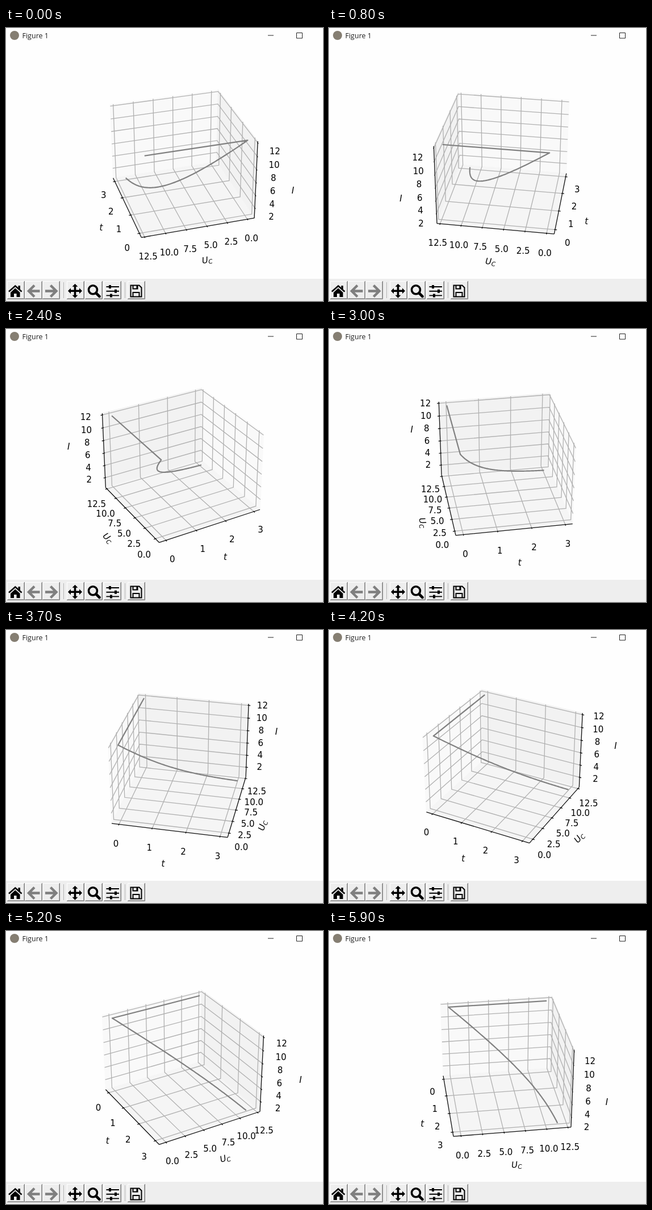
An HTML page that plays this animation: 558 px wide and 480 px high, repeating every 6000 ms.

```html
<!DOCTYPE html>
<html lang="en">
<head>
<meta charset="utf-8">
<title>Figure 1</title>
<style>
  html, body { margin: 0; width: 100%; height: 100%; overflow: hidden; background: #fefefe; }
  svg { display: block; width: 558px; height: 480px; }
  #plot text { font: 15px "DejaVu Sans", sans-serif; text-anchor: middle; }
  #plot .name { font-style: oblique; }
  #plot .sub { font-size: 10.5px; }
  #plot path { fill: none; stroke-width: 1.3; }
</style>
</head>
<body>
<svg viewBox="0 0 558 480">
  <rect width="558" height="480" fill="#fefefe"/>
  <circle cx="15" cy="13" r="8" fill="#857e72"/>
  <text x="28.5" y="18" fill="#222" font-size="12.5" font-family="'Open Sans', sans-serif">Figure 1</text>
  <path d="M461 13h10M511.5 8.5h10v9.5h-10z" fill="none" stroke="#222"/>

  <g id="plot"></g>

  <rect y="441" width="558" height="39" fill="#eee"/>
  <g id="buttons"></g>
  <path d="M101.5 447v28M209.5 447v28" stroke="#b4b4b4"/>
  <g id="icons" fill="none" stroke="#000">
    <path d="M5 463.5L16.3 453.5L27.6 463.5" stroke-width="2.6"/>
    <path d="M21.500 453h3.500v7h-3.500zM16.300 457.500l8.300 7.500v8h-6v-6h-4.600v6H8v-8z" fill="#000" stroke="none"/>
    <g stroke="#7f7f7f" stroke-width="4.4">
      <path d="M50 452.5L40 462.5L50 472.5M41 462.5h18.5"/>
      <path d="M78.500 452.500L88.500 462.500L78.500 472.500M87.500 462.500h-18.500"/>
    </g>
    <path d="M121.500 449.700l5 5h-3.200v5.700h5.700v-3.200l5 5-5 5v-3.200h-5.700v5.700h3.200l-5 5-5-5h3.200v-5.700h-5.700v3.200l-5-5 5-5v3.200h5.700v-5.700h-3.200z" fill="#000" stroke="none"/>
    <circle cx="153" cy="460.300" r="7.500" stroke-width="3.600"/>
    <path d="M158.500 466l6 6" stroke-width="4.600" stroke-linecap="round"/>
    <path d="M176.500 455h22.500M176.500 462.700h22.500M176.500 470.400h22.500" stroke-width="1.900"/>
    <path d="M183 452v6M193 459.700v6M185 467.400v6" stroke-width="4"/>
    <path d="M219.500 452.500h15l4 4v16h-19z" stroke-width="2"/>
    <path d="M223.500 472v-7h11v7M223.500 453v5.500h8v-5.500" stroke-width="2"/>
    <path d="M229.500 453h2.500v5h-2.500z" fill="#000" stroke="none"/>
  </g>
</svg>
<script>
const STEP = 100, FRAMES = 60;
const AZIM = -196.55, TURN = 3.204;        // degrees, degrees per step
const SCALE = 1707, CX = 308.7, CY = 233.2, DIST = 10;
const PAD = 1.35, NAME_PAD = 2.93;         // label offsets in units of D

const HALF = [4 / 7, 4 / 7, 3 / 7];        // half size of the data limits
const H = HALF.map(v => v * 25 / 24);      // half size of the drawn box
const D = HALF.map(v => v / 6);

const V = 12, I_END = V * Math.exp(-3);
const LIMITS = [[-0.15, 3.15], [-0.6, 12.6], [I_END, V]];
const PANES = ['#f9f9f9', '#f2f2f2', '#f5f5f5'];

// side: the direction in which the axis sits on the near edge of the box
const AXES = [
  { i: 0, side: 1, ticks: [0, 1, 2, 3], name: 't' },
  { i: 1, side: 0, ticks: [0, 2.5, 5, 7.5, 10, 12.5], name: 'U', sub: 'C', digits: 1 },
  { i: 2, side: 0, ticks: [2, 4, 6, 8, 10, 12], name: 'I' }
];

const toBox = (v, i) => {
  const [lo, hi] = LIMITS[i];
  return (2 * (v - lo) / (hi - lo) - 1) * HALF[i];
};
const put = (p, i, v) => p.map((q, j) => j === i ? v : q);
const flip = (p, i) => put(p, i, -p[i]);
const outward = (p, axis, k) =>
  p.map((q, j) => j === axis ? q : q + Math.sign(q) * k * D[j]);

// Capacitor charging: the jump at t = 0, then the exponential
const curve = [[0, V, V]];
for (let n = 0; n <= 90; n++) {
  const t = n / 30, s = Math.exp(-t);
  curve.push([t, V * (1 - s), V * s]);
}
const curveBox = curve.map(p => p.map(toBox));

function camera(deg) {
  const a = deg * Math.PI / 180, c = Math.cos(a), s = Math.sin(a);
  const se = 0.5, ce = Math.sqrt(3) / 2;
  const project = ([x, y, z]) => {
    const w = DIST - (ce * (c * x + s * y) + se * z);
    return [
      CX + SCALE * (c * y - s * x) / w,
      CY - SCALE * (ce * z - se * (c * x + s * y)) / w
    ];
  };
  const far = [c > 0 ? -H[0] : H[0], s > 0 ? -H[1] : H[1], -H[2]];
  return { project, far };
}

function drawPlot(deg) {
  const { project, far } = camera(deg);
  const line = pts => 'M' + pts.map(p => project(p).map(v => v.toFixed(2)).join(' ')).join('L');
  const path = (d, color, extra = '') => `<path d="${d}" stroke="${color}" ${extra}/>`;
  let out = '';

  PANES.forEach((color, i) => {
    const j = (i + 1) % 3, k = (i + 2) % 3;
    const a = flip(far, j), b = flip(a, k), c = flip(far, k);
    out += path(line([far, a, b, c]) + 'Z', color, `style="fill:${color}"`);
  });

  for (const { i, side, ticks, name, sub, digits = 0 } of AXES) {
    const start = flip(far, side), end = flip(start, i);
    const near = Math.sign(start[side]);
    let grid = '', marks = line([start, end]), labels = '';

    for (const v of ticks) {
      const at = toBox(v, i);
      const corner = put(far, i, at), pos = put(start, i, at);
      grid += line([flip(corner, (i + 1) % 3), corner, flip(corner, (i + 2) % 3)]);
      marks += line([0.2, -0.1].map(k => put(pos, side, pos[side] + near * k * D[side])));
      const [x, y] = project(outward(pos, i, PAD));
      labels += `<text x="${x}" y="${y + 12.8}">${v.toFixed(digits)}</text>`;
    }

    const [x, y] = project(outward(put(start, i, 0), i, NAME_PAD));
    let turn = 0;
    if (sub) {
      const [p, q] = [project(start), project(end)];
      turn = Math.atan((q[1] - p[1]) / (q[0] - p[0])) * 180 / Math.PI;
    }
    const tail = sub ? `<tspan class="sub" dy="2.6">${sub}</tspan>` : '';
    labels += `<text class="name" transform="translate(${x} ${y}) rotate(${turn})" y="${sub ? 4.2 : 5.4}">${name}${tail}</text>`;

    out += path(grid, '#b0b0b0') + path(marks, '#111') + labels;
  }

  return out + path(line(curveBox), '#808080',
    'style="stroke-width:2.2" stroke-linejoin="round" stroke-linecap="square"');
}

// Raised toolbar buttons
document.getElementById('buttons').innerHTML = [2, 33, 64, 107, 139, 172, 214].map(x =>
  `<path d="M${x + 0.5} 477V445.5H${x + 30}" fill="none" stroke="#fff"/>` +
  `<path d="M${x} 476.5H${x + 30.5}V445" fill="none" stroke="#777"/>` +
  `<path d="M${x + 1} 475.5H${x + 29.5}V446" fill="none" stroke="#b0b0b0"/>`).join('');

const plot = document.getElementById('plot');
let shown = -1;
function update(now) {
  const n = Math.floor(now / STEP) % FRAMES;
  if (n !== shown) {
    shown = n;
    plot.innerHTML = drawPlot(Math.round(AZIM + TURN * n));   // whole degrees
  }
}
function loop() {
  update(performance.now());
  requestAnimationFrame(loop);
}
loop();
</script>
</body>
</html>
```
